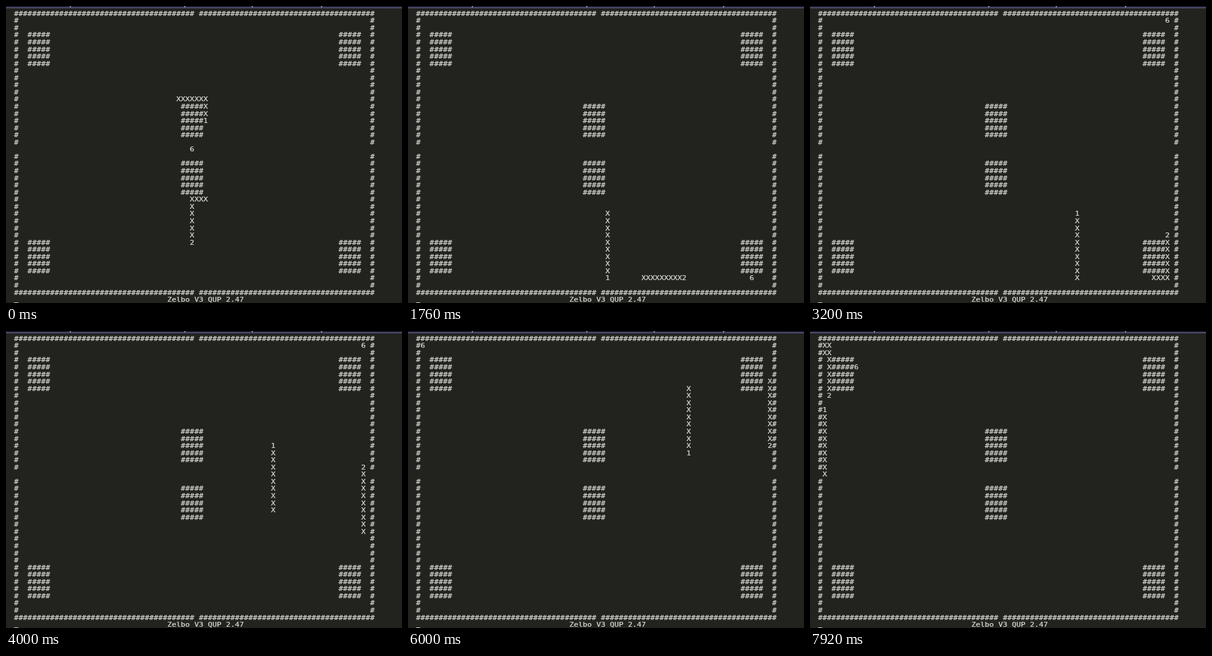
Animation of 640x480 px, one loop 8 s. Source, as an HTML page with a canvas:

```html
<!DOCTYPE html>
<html lang="en">
<head>
<meta charset="utf-8">
<title>Two snakes in a terminal</title>
<style>
  html, body { margin: 0; width: 100%; height: 100%; overflow: hidden; background: #22221f; }
  canvas { display: block; }
</style>
</head>
<body>
<canvas id="stage" width="640" height="480"></canvas>
<script>
const ctx = document.getElementById('stage').getContext('2d');
const LOOP = 8000, TICK = 80;
const COLS = 80, ROWS = 40, LENGTH = 10, GATE_ROW = 19;
const LEFT = 13, BASELINE = 15.7, CELL_W = 7.285, CELL_H = 11.56;
const SQUASH = 0.8; // the terminal picture is flattened vertically
const STEPS = { R: [1, 0], L: [-1, 0], D: [0, 1], U: [0, -1] };

// Expands turns such as "R6 D7" into cells; leaving one side enters the other.
function route(x, y, turns) {
  const cells = [[x, y]];
  for (const turn of turns.split(' ')) {
    const [dx, dy] = STEPS[turn[0]];
    for (let i = Number(turn.slice(1)); i > 0; i--) {
      x = (x + dx + COLS) % COLS;
      y += dy;
      cells.push([x, y]);
    }
  }
  return cells;
}

const first = route(36, 12, 'R6 D7 L3 D1 R3 D17 R15 U36 R3 D18 R21 U9');
const second = route(42, 26, 'L3 D12 R1 U1 R37 U36 R1 D18 R3 U18 R1 D7');
const meals = [[39, 19], [74, 37], [77, 1], [1, 1], [8, 4]];

// [time, moves made]: a steady crawl with two short stalls
const pace = [[80, 0], [1040, 17], [4000, 65], [4160, 65], [4800, 80], [4880, 80], [6000, 97], [7920, 130]];

function movesAt(time) {
  const i = pace.findIndex(([t]) => t >= time);
  if (i <= 0) return 0;
  const [t0, m0] = pace[i - 1], [t1, m1] = pace[i];
  return Math.floor(m0 + (m1 - m0) * (time - t0) / (t1 - t0));
}

function put(text, col, row) {
  [...text].forEach((char, i) => {
    const x = LEFT + (col + i) * CELL_W, y = (BASELINE + row * CELL_H) / SQUASH;
    ctx.fillText(char, x, y);
    ctx.strokeText(char, x, y);
  });
}

function rect(color, ...box) {
  ctx.fillStyle = color;
  ctx.fillRect(...box);
}

function drawWindow() {
  rect('#22221f', 0, 0, 640, 480);
  rect('#1b1b2b', 0, 0, 640, 2);
  rect('#5c5c86', 0, 2, 640, 1.5);
  for (const x of [103, 288, 397, 509]) rect('#8c8ca0', x, 0, 2, 2);
  rect('#d4d4d0', LEFT, 479, 7, 1); // cursor
}

function drawArena() {
  const wall = '#'.repeat(40) + ' ' + '#'.repeat(39);
  const block = (col, top) => {
    for (let i = 0; i < 5; i++) put('#####', col, top + i);
  };
  put(wall, 0, 0);
  put(wall, 0, ROWS - 1);
  for (let row = 1; row < ROWS - 1; row++) {
    if (row !== GATE_ROW) put('#' + ' '.repeat(COLS - 2) + '#', 0, row);
  }
  for (const top of [3, 32]) {
    block(3, top);
    block(72, top);
  }
  block(37, 13);
  block(37, 21);
  put('Zelbo V3 QUP 2.47', 34, ROWS);
}

function drawSnake(trail, name) {
  trail.slice(-LENGTH).forEach(([col, row], i) => put(i === LENGTH - 1 ? name : 'X', col, row));
}

function draw(time) {
  const moves = movesAt(Math.floor(time / TICK) * TICK);
  const trail1 = first.slice(0, moves + LENGTH);
  const trail2 = second.slice(0, Math.max(0, moves - 1) + LENGTH); // starts one move late
  const visited = [...trail1, ...trail2];
  const meal = meals.find(([x, y]) => !visited.some(([col, row]) => col === x && row === y));

  drawWindow();
  ctx.save();
  ctx.scale(1, SQUASH);
  ctx.font = '12.1px "DejaVu Sans Mono", monospace';
  ctx.fillStyle = ctx.strokeStyle = '#d8d8d4';
  ctx.lineWidth = 0.3;
  drawArena();
  put('6', ...meal);
  drawSnake(trail1, '1');
  drawSnake(trail2, '2');
  ctx.restore();
}

const start = performance.now();
function frame() {
  draw((performance.now() - start) % LOOP);
  requestAnimationFrame(frame);
}
frame();
</script>
</body>
</html>
```
